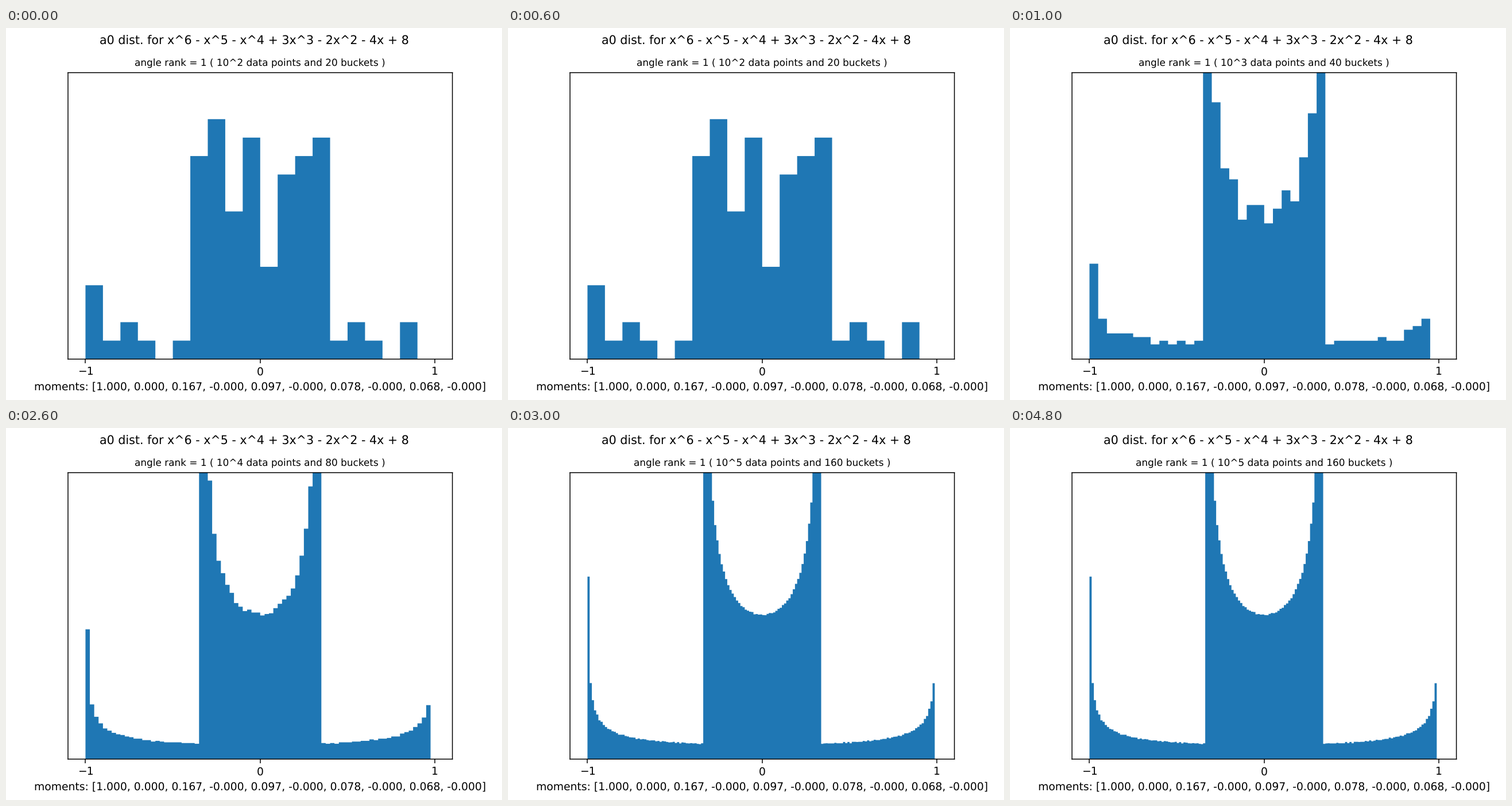
Recreate the animation shown at these times as a matplotlib script. Size 864x648 px, loop 6000 ms.

```python
import numpy as np
import matplotlib.pyplot as plt
from matplotlib.animation import FuncAnimation

MOMENTS = [1, 0, 0.167, -0.0, 0.097, -0.0, 0.078, -0.0, 0.068, -0.0]
STAGES = 4

plt.rcParams.update({
    "font.family": "DejaVu Sans",
    "text.hinting": "none",
    "path.snap": False,
})
fig, ax = plt.subplots(figsize=(6.4, 4.8), dpi=135)
fig.suptitle("a0 dist. for x^6 - x^5 - x^4 + 3x^3 - 2x^2 - 4x + 8", fontsize=11)


def normalized_traces(count):
    """Frobenius traces over F_{2^r}, scaled to [-1, 1], for r = 1..count.

    With t = x + 2/x the polynomial becomes (t - 1)(t^2 - 7), and each
    root t is 2 sqrt(2) times the cosine of a Frobenius angle.
    """
    r = np.arange(1, count + 1)
    angles = np.arccos(np.array([1, 7**0.5, -(7**0.5)]) / 8**0.5)
    return np.cos(np.outer(r, angles)).mean(axis=1)


def draw(frame):
    stage = min(frame, STAGES - 1)
    power, buckets = stage + 2, 20 * 2**stage
    # The topmost bucket is left out of the histogram.
    edges = np.linspace(-1, 1, buckets + 1)[:-1]

    ax.clear()
    ax.hist(normalized_traces(10**power), bins=edges, density=True,
            histtype="stepfilled", linewidth=0)
    ax.set_xlim(-1.1, 1.1)
    ax.set_ylim(0, 1.6)
    ax.set_xticks([-1, 0, 1])
    ax.set_yticks([])
    ax.set_title(
        f"angle rank = 1 ( 10^{power} data points and {buckets} buckets )",
        fontsize=9,
    )
    ax.set_xlabel("moments: [" + ", ".join(f"{m:.3f}" for m in MOMENTS) + "]")


# The last stage is held for three of the six seconds.
anim = FuncAnimation(fig, draw, frames=6, init_func=lambda: None,
                     interval=1000, repeat=True, repeat_delay=0)
plt.show()
```
